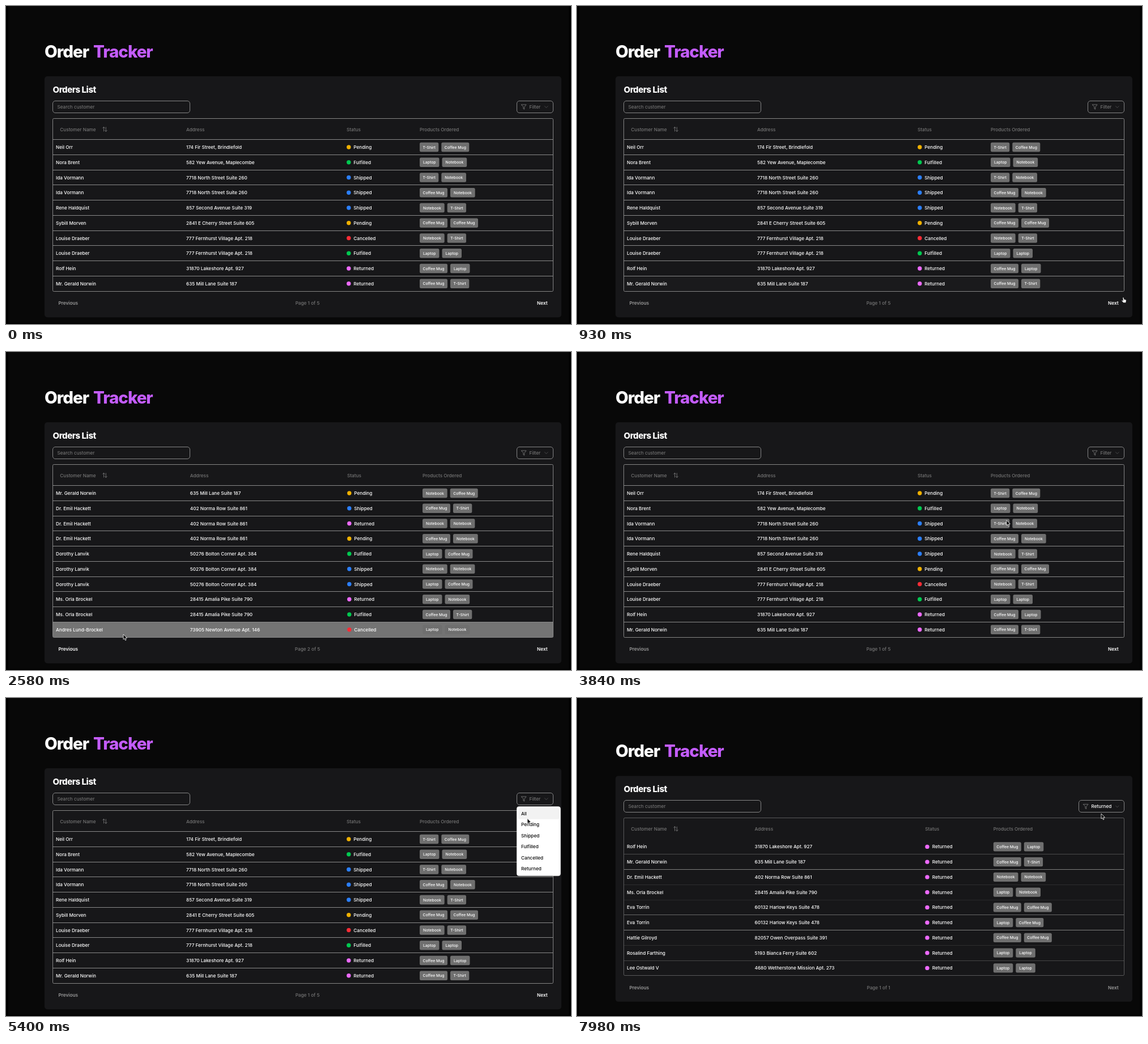
Animation, 997 px wide and 561 px high, one loop 8000 ms. Source, as an HTML page:

```html
<!DOCTYPE html>
<html lang="en">
<head>
<meta charset="utf-8">
<title>Order Tracker</title>
<style>
  html, body { margin: 0; width: 100%; height: 100%; overflow: hidden; background: #000; }
  svg { display: block; width: 100vw; height: 100vh; }
  text { font: 500 8.2px Inter, "Open Sans", sans-serif; fill: #fff; white-space: pre; }
  .title { font-size: 29.5px; font-weight: 800; letter-spacing: -.035em; }
  .accent { fill: #c45cff; }
  .heading { font-size: 15px; font-weight: 800; letter-spacing: -.03em; }
  .head { fill: #757575; }
  .soft { fill: #808080; font-weight: 400; }
  .nav { font-weight: 600; }
  .off { fill: #9a9a9a; }
  .tag { font-size: 6.8px; text-anchor: middle; }
  .mid { text-anchor: middle; }
  .item { fill: #0a0a0a; }
  .box { fill: none; stroke: #858585; }
  .icon { fill: none; stroke: #808080; stroke-width: .8; stroke-linecap: round; stroke-linejoin: round; }
  .chip { fill: #6f6f6f; }
  .row { fill: #747474; }
</style>
</head>
<body>
<svg id="stage" viewBox="0 0 997 561" preserveAspectRatio="none"></svg>
<script>
const LOOP = 8000, ROW = 26.75, FADE = 150;

const people = [
  ['Neil Orr', '174 Fir Street, Brindlefold'],
  ['Nora Brent', '582 Yew Avenue, Maplecombe'],
  ['Ida Vormann', '7718 North Street Suite 260'],
  ['Rene Haldquist', '857 Second Avenue Suite 319'],
  ['Sybill Morven', '2841 E Cherry Street Suite 605'],
  ['Louise Draeber', '777 Fernhurst Village Apt. 218'],
  ['Rolf Hein', '31870 Lakeshore Apt. 927'],
  ['Mr. Gerald Norwin', '635 Mill Lane Suite 187'],
  ['Dr. Emil Hackett', '402 Norma Row Suite 861'],
  ['Dorothy Lanvik', '50276 Bolton Corner Apt. 384'],
  ['Ms. Orla Brockel', '28415 Amalia Pike Suite 790'],
  ['Andres Lund-Brockel', '73905 Newton Avenue Apt. 146'],
  ['Eva Torrin', '60132 Harlow Keys Suite 478'],
  ['Hattie Gilroyd', '82057 Owen Overpass Suite 391'],
  ['Rosalind Farthing', '5193 Bianca Ferry Suite 602'],
  ['Lee Ostwald V', '4680 Wetherstone Mission Apt. 273']
];
const statuses = {
  P: ['Pending', '#f0b100'], S: ['Shipped', '#2b7fff'], F: ['Fulfilled', '#00c950'],
  X: ['Cancelled', '#fb2c36'], R: ['Returned', '#ed6aff']
};
const products = {
  C: ['Coffee Mug', 49], N: ['Notebook', 43.7], L: ['Laptop', 34.5], T: ['T-Shirt', 33.3]
};

// Each order: customer index, status letter, two product letters.
const views = [
  { rows: '0PTC 1FLN 2STN 2SCN 3SNT 4PCC 5XNT 5FLL 6RCL 7RCT',
    shift: 0, address: 318, status: 601, gap: 12.3, tags: 730, page: 'Page 1 of 5', next: true },
  { rows: '7PNC 8SCT 8RNN 8PCN 9FLC 9SNN 9SLC 10RLN 10FCT 11XLN',
    shift: 0, address: 324.8, status: 602, gap: 12.3, tags: 735, page: 'Page 2 of 5', prev: true, next: true },
  { rows: '6RCL 7RCT 8RNN 10RLN 12RCC 12RLC 13RCC 14RLL 15RLL',
    shift: 13.4, address: 313.6, status: 614.2, gap: 12.6, tags: 734.8, page: 'Page 1 of 1', filter: 'Returned',
    lines: [0, .45, .9, .2, .15, .7, .9, .2, .4], frame: .6 }
];

const text = (x, y, str, cls = '') => `<text x="${x}" y="${y}" class="${cls}">${str}</text>`;
const rect = (x, y, w, h, r, attrs) => `<rect x="${x}" y="${y}" width="${w}" height="${h}" rx="${r}" ${attrs}/>`;
const icon = (x, y, d, attrs = '') => `<path class="icon" transform="translate(${x} ${y})" d="${d}" ${attrs}/>`;
const crisp = v => Math.floor(v) + .5;

function orderRow(code, i, view) {
  const [, id, state, a, b] = code.match(/(\d+)(.)(.)(.)/);
  const y = 249 + view.shift + ROW * i;
  const [label, color] = statuses[state];
  let x = view.tags;
  let out = rect(83, y - ROW / 2, 882.5, ROW, 0, 'class="row" opacity="0"')
    + text(88, y + 3, people[id][0])
    + text(view.address, y + 3, people[id][1])
    + `<circle cx="${view.status + 3.8}" cy="${y}" r="3.7" fill="${color}"/>`
    + text(view.status + view.gap, y + 3, label);
  for (const key of [a, b]) {
    const [name, w] = products[key];
    out += rect(x, y - 8.2, w, 16.4, 2.5, 'class="chip"') + text(x + w / 2, y + 2.5, name, 'tag');
    x += w + 5;
  }
  return out;
}

function drawView(view) {
  const codes = view.rows.split(' '), s = view.shift;
  const top = crisp(198.5 + s), bottom = 235.7 + s + ROW * codes.length;
  const boxY = crisp(167 + s), buttonX = view.filter ? 885.5 : 901.5;
  let out = text(68, 90.5 + s, 'Order', 'title') + text(154, 90.5 + s, 'Tracker', 'title accent')
    + rect(68, 124 + s, 912, bottom + 46 - 124 - s, 5, 'fill="#171719"')
    + text(82.5, 152.8 + s, 'Orders List', 'heading')
    + rect(82.5, boxY, 242, 21, 4.5, 'class="box"')
    + text(90.5, 181 + s, 'Search customer', 'soft')
    + rect(buttonX, boxY, 965.5 - buttonX, 21, 4.5, 'class="box"')
    + icon(buttonX + 8, 174 + s, 'M0 0H8.6L5.2 4.2V8.2L3.4 7.2V4.2Z')
    + text(buttonX + 22, 181 + s, view.filter || 'Filter', view.filter ? '' : 'head')
    + icon(950.5, 176.7 + s, 'M0 0L2.8 2.8L5.6 0', 'opacity=".6"')
    + text(95.3, 220.5 + s, 'Customer Name', 'head')
    + icon(170.5, 213.4 + s, 'M0 2L2 0L4 2M2 0V7.6M3.8 6L5.8 8L7.8 6M5.8 8V.4')
    + text(view.address, 220.5 + s, 'Address', 'head')
    + text(view.status, 220.5 + s, 'Status', 'head')
    + text(view.tags, 220.5 + s, 'Products Ordered', 'head');
  out += codes.map((code, i) => orderRow(code, i, view)).join('');
  codes.forEach((code, i) => {
    const y = crisp(235.7 + s + ROW * i);
    out += `<path d="M83 ${y}H965" stroke="#8a8a8a" opacity="${view.lines ? view.lines[i] : 1}"/>`;
  });
  return out
    + rect(82.5, top, 883, crisp(bottom) - top, 2, `class="box" opacity="${view.frame || 1}"`)
    + text(92.5, bottom + 24, 'Previous', 'nav ' + (view.prev ? '' : 'off'))
    + text(532, bottom + 24, view.page, 'mid head')
    + text(937, bottom + 24, 'Next', 'nav ' + (view.next ? '' : 'off'));
}

const options = ['All', 'Pending', 'Shipped', 'Fulfilled', 'Cancelled', 'Returned'];
const menuHtml = rect(901.3, 191.5, 77.2, 122.3, 4, 'fill="#fff" stroke="#e4e4e4" stroke-width=".5"')
  + rect(904, 194.3, 72, 19.4, 2.5, 'id="mark" fill="#f2f2f2"')
  + options.map((name, i) => text(909, 207 + 19.4 * i, name, 'item')).join('');

const stage = document.getElementById('stage');
stage.innerHTML = rect(4, 0, 989.5, 559, 0, 'fill="#080808"')
  + views.map(view => `<g class="view">${drawView(view)}</g>`).join('')
  + `<g id="menu">${menuHtml}</g>`
  + '<g id="cursor"><path id="arrow" d="M0 0V9L2 7.3L3.5 10.7L5 10L3.6 6.8L6.4 6.5Z" fill="#000" stroke="#fff" stroke-width=".8"/>'
  + '<path id="hand" d="M0 1Q.9 -.3 1.8 1L2.4 4L5.6 4.8Q6.4 5.2 6.1 6.6L5.4 10H1.2L-1.8 6.6Q-2 5.2 -.6 5.6L.6 6.6Z" fill="#fff" stroke="#111" stroke-width=".5"/></g>';

const $ = id => document.getElementById(id);
const groups = [...document.querySelectorAll('.view')];
const rowRects = groups.map(g => [...g.querySelectorAll('.row')]);

// Pointer path: time, x, y.
const path = [
  [30, 640, 72], [400, 815, 285], [700, 950, 478], [800, 960, 505], [930, 963, 513.5],
  [1150, 950, 521], [2220, 950, 521], [2340, 740, 494], [2580, 207.5, 498], [2960, 112, 520],
  [3150, 112, 520], [3500, 400, 420], [3840, 757.5, 297], [4560, 933, 177], [4980, 933, 177],
  [5400, 920, 212.5], [6200, 912, 300], [6390, 912, 300], [6540, 920.5, 300], [7530, 920.5, 300],
  [7650, 923, 262], [7740, 924, 238], [7980, 925, 204], [8000, 925, 204]
];

const slope = (i, k) => (path[i + 1][k] - path[i][k]) / (path[i + 1][0] - path[i][0]);
function tangent(i, k) {
  if (i === 0 || i === path.length - 1) return 0;
  const a = slope(i - 1, k), b = slope(i, k);
  return a * b <= 0 ? 0 : 2 * a * b / (a + b);
}
function pointer(t) {
  if (t <= path[0][0]) return [path[0][1], path[0][2]];
  let i = 0;
  while (i < path.length - 2 && path[i + 1][0] <= t) i++;
  const d = path[i + 1][0] - path[i][0], u = (t - path[i][0]) / d, v = 1 - u;
  return [1, 2].map(k =>
    path[i][k] * (1 + 2 * u) * v * v + path[i + 1][k] * u * u * (3 - 2 * u)
    + d * u * v * (tangent(i, k) * v - tangent(i + 1, k) * u));
}

const current = t => t < 1500 ? 0 : t < 3080 ? 1 : t < 6800 ? 0 : 2;
const canHover = t => t > 30 && t < 3000 || t > 3870 && t < 4980 || t > 7530;

function hoveredRow(t) {
  if (!canHover(t)) return -1;
  const v = current(t), [, y] = pointer(t);
  const i = Math.floor((y - 235.7 - views[v].shift) / ROW);
  return i < rowRects[v].length ? i : -1;
}

function isHand(t, x, y) {
  const view = views[current(t)];
  if (y > 511) return x > 925 ? view.next : x < 140 && view.prev;
  return !view.filter && x > 901 && y > 167 && y < 189;
}

function render(t) {
  const v = current(t), [x, y] = pointer(t);
  groups.forEach((g, i) => g.style.display = i === v ? '' : 'none');

  // A row's highlight is the share of the last moments spent over it.
  const steps = 30, share = {};
  for (let k = 0; k < steps; k++) {
    const row = hoveredRow(t - k * FADE / steps);
    share[row] = (share[row] || 0) + 1 / steps;
  }
  rowRects[v].forEach((r, i) => r.setAttribute('opacity', share[i] || 0));

  const open = t >= 4950 && t < 6750;
  $('menu').style.display = open ? '' : 'none';
  $('menu').setAttribute('opacity', Math.max(0, Math.min(1, (t - 4950) / 120)));
  const item = Math.min(5, Math.floor((y - 194.3) / 19.4));
  $('mark').style.display = item < 0 ? 'none' : '';
  $('mark').setAttribute('y', 194.3 + 19.4 * item);

  const hand = isHand(t, x, y);
  $('cursor').style.display = t < 30 ? 'none' : '';
  $('cursor').setAttribute('transform', `translate(${x} ${y})`);
  $('hand').style.display = hand ? '' : 'none';
  $('arrow').style.display = hand ? 'none' : '';
}

const start = performance.now();
function tick() {
  render((performance.now() - start) % LOOP);
  requestAnimationFrame(tick);
}
tick();
</script>
</body>
</html>
```
